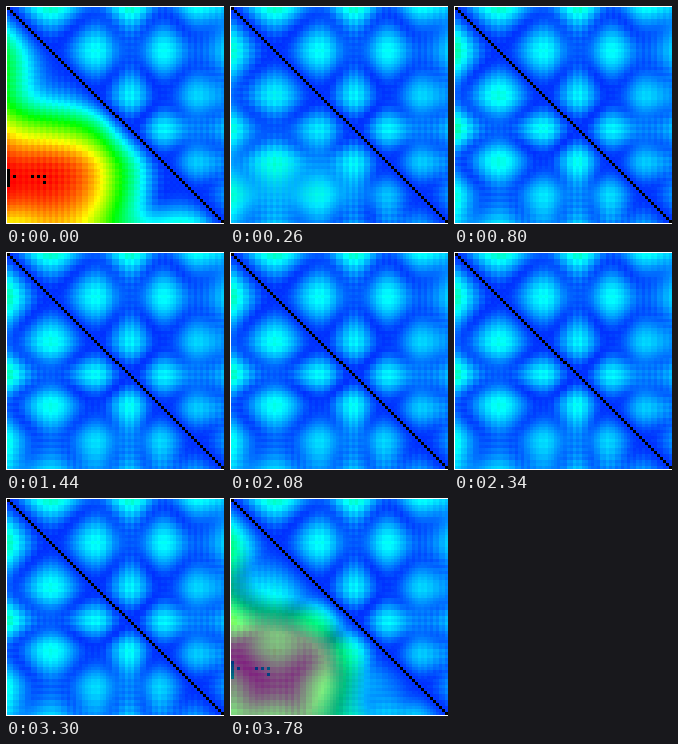
Recreate the animation shown at these times as a matplotlib script. Size 218 by 218 pixels, loop 3840 ms.

```python
import numpy as np
import matplotlib.pyplot as plt
from matplotlib.animation import FuncAnimation
from matplotlib.colors import hsv_to_rgb

STAGE, CELLS, CELL = 218, 72, 3
KEYS, TICK = 24, 20            # each pose: 100 ms still, then a 60 ms blend
TICKS_PER_KEY, HOLD = 8, 5
FLOOR = 0.045
OFF_SCALE = 11                 # number of cells beyond the colour scale

index = np.arange(CELLS)
place = (index + 0.5) * CELL
lower = np.tri(CELLS, k=-1, dtype=bool)

# The chain zigzags between turns; each row is one coordinate at the turns.
TURNS = np.array([0, 42, 92, 122, 155, 188, 216.])
FOLDED = np.array([[0, .02, .06, .09, .05, .02, .11],
                   [0, .04, .02, .06, -.01, -.03, -.06],
                   [.17, -.14, .10, -.12, .10, -.09, 0]])
OPEN = np.array([[.90, .95, .75, .37, .05, .04, .20],
                 [.38, 0, -.06, -.10, 0, .03, .20],
                 [0, 0, 0, 0, 0, 0, 0]])


def curve(turns, values):
    """Smooth cubic curve through the turns, sampled at every cell."""
    slope = np.gradient(values, turns)
    i = np.clip(np.searchsorted(turns, place) - 1, 0, len(turns) - 2)
    step = turns[i + 1] - turns[i]
    t = (place - turns[i]) / step
    return ((1 + 2 * t) * (1 - t) ** 2 * values[i]
            + t * (1 - t) ** 2 * step * slope[i]
            + t * t * (3 - 2 * t) * values[i + 1]
            - t * t * (1 - t) * step * slope[i + 1])


def chain(points, turns=TURNS):
    side = 0.010 * (-1.0) ** index
    wobble = [side * np.sin(place / 31 + phase) for phase in (0, 2, 4)]
    return np.array([curve(turns, p) for p in points]) + wobble


def distances(pos):
    diff = pos[:, :, None] - pos[:, None, :]
    return np.sqrt((diff ** 2).sum(axis=0) + FLOOR ** 2)


def paint(v):
    hue = (1 - np.clip(v, 0, 1)) * 2 / 3
    rgb = hsv_to_rgb(np.dstack([hue, np.ones_like(v), np.ones_like(v)]))
    rgb[(v > 1) | np.eye(CELLS, dtype=bool)] = 0
    return rgb


goal = distances(chain(FOLDED))
unfolded = chain(OPEN)
limit = np.sort(distances(unfolded)[lower])[-OFF_SCALE - 1]
unfolded /= limit


def pose(k):
    """Rapid collapse from the open chain, then slow settling."""
    openness = 0.25 ** k
    ease = 0.8 ** max(k - 3, 0)
    turns = TURNS.copy()
    turns[4] -= 6 * (1 - ease)
    settled = chain(FOLDED, turns) * (1.03 + 0.1 * ease)
    moving = distances(openness * unfolded + (1 - openness) * settled)
    return paint(np.where(lower, moving, goal))


poses = [pose(k) for k in range(KEYS)]

fig = plt.figure(figsize=(STAGE / 100, STAGE / 100), dpi=100, facecolor="white")
side = CELLS * CELL / STAGE
ax = fig.add_axes([1 / STAGE, 1 / STAGE, side, side])
ax.axis("off")
image = ax.imshow(poses[0], interpolation="nearest", aspect="auto")


def update(tick):
    k, r = divmod(tick, TICKS_PER_KEY)
    now = poses[k]
    if r >= HOLD:
        now = (now + poses[(k + 1) % KEYS]) / 2
    image.set_data(now)
    return [image]


anim = FuncAnimation(fig, update, frames=KEYS * TICKS_PER_KEY, interval=TICK,
                     repeat=True, repeat_delay=0, blit=False)
plt.show()
```
